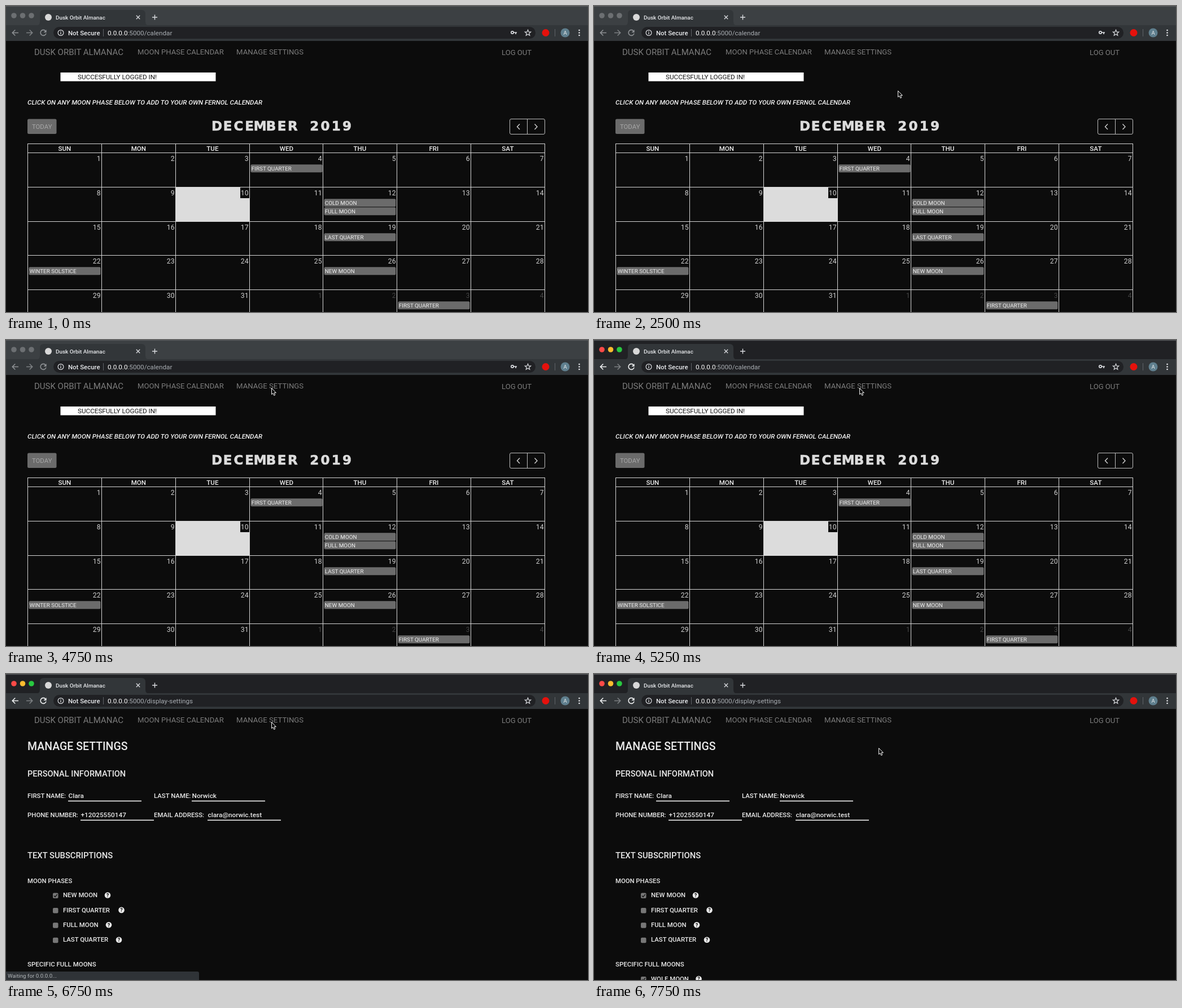
These frames come from a looping animation (1031 px wide and 543 px high, 8000 ms). An HTML page:

```html
<!DOCTYPE html>
<html lang="en">
<head>
<meta charset="utf-8">
<title>Moon calendar</title>
<style>
html, body { margin: 0; width: 100%; height: 100%; overflow: hidden; background: #0c0c0c; }
svg { display: block; font-family: Roboto, Arial, sans-serif; }
text { white-space: pre; }
</style>
</head>
<body>
<svg id="stage" width="1031" height="543" viewBox="0 0 1031 543"></svg>
<script>
const LOOP = 8000;
const FOCUS = 5250, HOVER = 6250, LOAD = 6500, OPEN = 6750, DONE = 7250;

// Pointer positions as [time, x, y]; it jumps from one to the next.
const pointer = [
  [500, 693, 4], [750, 645, 11], [1500, 644, 12], [1750, 642, 91], [2000, 624, 152],
  [2250, 610, 176], [2500, 538, 150], [3250, 515, 131], [3500, 497, 128], [3750, 494, 128],
  [4000, 465, 118], [4250, 465, 95], [4500, 468, 90], [4750, 470, 85], [7750, 504, 131]
];

const text = (x, y, size, fill, str, attrs = '') =>
  `<text x="${x}" y="${y}" font-size="${size}" fill="${fill}" ${attrs}>${str}</text>`;
const rect = (x, y, w, h, fill, r = 0, attrs = '') =>
  `<rect x="${x}" y="${y}" width="${w}" height="${h}" rx="${r}" fill="${fill}" ${attrs}/>`;
const circle = (x, y, r, fill, attrs = '') =>
  `<circle cx="${x}" cy="${y}" r="${r}" fill="${fill}" ${attrs}/>`;
const line = (d, color, width = 1, attrs = '') =>
  `<path d="${d}" fill="none" stroke="${color}" stroke-width="${width}" ${attrs}/>`;
const during = (from, to, ...parts) =>
  `<g data-from="${from}" data-to="${to}">${parts.join('')}</g>`;
const MIDDLE = 'text-anchor="middle"', END = 'text-anchor="end"', MEDIUM = 'font-weight="500"';

function reload(color) {
  return line('M70 44.2A5 5 0 1 0 71 48.6', color, 1.6) +
    `<path d="M71.6 42v5h-5z" fill="${color}"/>`;
}

function frame(strip, lights, icon) {
  return rect(0, 0, 1031, 35, strip) + rect(0, 0, 1031, 1.2, '#55585b') +
    '<path d="M53 35q7 0 7-7V14q0-7 7-7H240q7 0 7 7V28q0 7 7 7z" fill="#323639"/>' +
    lights.map((c, i) => circle(14 + 15.5 * i, 17, 4.8, c)).join('') +
    line('M259 20h9M263.5 15.5v9', '#dadce0', 1.4) +
    rect(0, 34, 1031, 28, '#323639') + rect(84, 37, 854, 21, '#202124', 10.5) +
    line('M22 47.5H11.5M16.3 42.5l-5 5 5 5', icon, 1.6);
}

function tabTitle(str, size) {
  return text(88, 23.5, size, '#e8eaed', str, MEDIUM);
}

function address(path) {
  return text(180, 51.5, 11.7, '#fff', `0.0.0.0<tspan fill="#a8adb2">:5000/${path}</tspan>`);
}

function browser() {
  const star = Array.from({ length: 10 }, (_, i) => {
    const r = i % 2 ? 2.4 : 5.5, a = i * Math.PI / 5;
    return `${924.5 + r * Math.sin(a)} ${47.8 - r * Math.cos(a)}`;
  }).join('L');
  const favicon = circle(75, 20, 6, '#d8d8d8');
  const grey = '#6c6f72', bright = '#f1f3f4', dull = '#8e9194';
  return [
    during(0, FOCUS, frame('#3c4043', [grey, grey, grey], dull), reload(dull)),
    during(FOCUS, LOOP, frame('#202124', ['#fc4a47', '#fdbc2f', '#29c840'], bright)),
    during(FOCUS, LOAD, reload(bright)),
    during(OPEN, LOOP, reload(bright)),
    during(LOAD, OPEN, line('M61.5 43l9 9M70.5 43l-9 9', bright, 1.6),
      line('M76 15.5A4.5 4.5 0 0 0 73 24', '#9aa0a6', 1.5),
      tabTitle('0.0.0.0:5000/display-settings', 9.9)),
    during(0, LOAD, favicon, tabTitle('Dusk Orbit Almanac', 9.9), address('calendar'),
      circle(897, 47, 2.2, 'none', 'stroke="#dadce0" stroke-width="1.7"'),
      line('M899 47h6M903 47v3', '#dadce0', 1.7)),
    during(OPEN, LOOP, favicon, tabTitle('Dusk Orbit Almanac', 9.9)),
    during(LOAD, LOOP, address('display-settings')),
    line('M230.8 16.8l6.4 6.4M237.2 16.8l-6.4 6.4', '#dadce0', 1.3),
    line('M36 47.5h10.5M41.7 42.5l5 5-5 5', '#7d8083', 1.6),
    circle(97, 47.5, 4.9, 'none', 'stroke="#dadce0" stroke-width="1.2"'),
    line('M97 46.6v3.6M97 44.3v1.3', '#dadce0', 1.3),
    text(110, 51.5, 11.4, '#e8eaed', 'Not Secure', MEDIUM),
    line('M172.5 41v13M972.5 41v13', '#5f6368'),
    line(`M${star}Z`, '#dadce0', 1.2),
    circle(956, 47.5, 6.5, '#e5110c'),
    circle(990.5, 47.5, 8, '#5f7f8e'),
    text(990.5, 51, 9.5, '#eee', 'A', MIDDLE),
    [43, 47.5, 52].map(y => circle(1015.5, y, 1.3, '#e8eaed')).join('')
  ].join('');
}

function nav() {
  const grey = '#7c7c7c', link = c => text(408, 86.3, 13.2, c, 'MANAGE SETTINGS');
  return text(50, 87, 15, grey, 'DUSK ORBIT ALMANAC') +
    text(233, 86.3, 13.1, grey, 'MOON PHASE CALENDAR') +
    text(878, 87, 13.1, grey, 'LOG OUT') +
    during(0, HOVER, link(grey)) + during(HOVER, OPEN, link('#f2f2f2')) + during(OPEN, LOOP, link(grey));
}

function calendar() {
  const colX = c => 38.5 + Math.round(130.86 * c), rowY = r => 260.5 + Math.round(60.8 * r);
  const out = [
    rect(96.5, 118, 275, 15.5, '#fff'),
    text(127, 130, 11.7, '#111', 'SUCCESFULLY LOGGED IN!'),
    text(38, 175, 11.7, '#f2f2f2', 'CLICK ON ANY MOON PHASE BELOW TO ADD TO YOUR OWN FERNOL CALENDAR',
      'font-style="italic" font-weight="500"'),
    rect(38, 200.5, 51.5, 26.5, '#6b6b6b', 2.5),
    text(63.7, 218, 11.4, '#a8a8a8', 'TODAY', MIDDLE),
    rect(892.5, 200.5, 62, 27, 'none', 2.5, 'stroke="#bdbdbd"'),
    line('M923.5 200v27', '#bdbdbd'),
    line('M910 209.5l-4.5 4.7 4.5 4.7M936.5 209.5l4.5 4.7-4.5 4.7', '#d0d0d0', 1.4)
  ];
  const title = 'DECEMBER 2019';
  const xs = [...title].map((_, i) => (373.5 + 19.2 * i).toFixed(1)).join(' ');
  out.push(text(xs, 220.5, 23, '#dcdcdc', title,
    `${MIDDLE} font-weight="bold" font-family="DejaVu Sans, sans-serif" stroke="#dcdcdc" stroke-width=".6"`));

  out.push(rect(colX(2), rowY(1), 131, 61, '#dcdcdc'), rect(415, rowY(1), 16, 19.5, '#0c0c0c'));
  let grid = 'M38 244.5H955';
  for (let r = 0; r < 5; r++) grid += `M38 ${rowY(r)}H955`;
  for (let c = 0; c < 8; c++) grid += `M${colX(c)} 244V543`;
  out.push(line(grid, '#d6d6d6'));

  ['SUN', 'MON', 'TUE', 'WED', 'THU', 'FRI', 'SAT'].forEach((day, c) =>
    out.push(text(colX(c) + 65.4, 256.7, 11.6, '#ececec', day, `${MIDDLE} ${MEDIUM}`)));
  for (let i = 0; i < 35; i++) {
    const r = Math.floor(i / 7);
    out.push(text(colX(i % 7 + 1) - 1.8, rowY(r) + 14, 12.3, i < 31 ? '#cfcfcf' : '#454545', i % 31 + 1, END));
  }
  [[3, 0, 0, 'FIRST QUARTER'], [4, 1, 0, 'COLD MOON'], [4, 1, 1, 'FULL MOON'], [4, 2, 0, 'LAST QUARTER'],
   [0, 3, 0, 'WINTER SOLSTICE'], [4, 3, 0, 'NEW MOON'], [5, 4, 0, 'FIRST QUARTER']
  ].forEach(([c, r, slot, name]) => {
    const x = colX(c) + 2, y = rowY(r) + 20.8 + 15 * slot;
    out.push(rect(x, y, 127, 14, '#6b6b6b', 2), text(x + 1.3, y + 10.6, 9.9, '#f0f0f0', name));
  });
  return out.join('');
}

function settings() {
  const ink = '#e9e9e9';
  const field = (x, y, label, inputX, value) =>
    text(x, y, 11.4, ink, label) + text(inputX + 0.5, y, 11.8, ink, value) +
    rect(inputX, y + 4.6, 130, 1.6, '#f2f2f2');
  const option = (i, label, helpX, on) => {
    const y = 392.5 + 26.4 * i - (i > 4 ? 9.9 : 0);
    return rect(83, y - 4, 9.5, 9.5, '#777', 2) +
      (on ? line(`M85 ${y + 1}l2 2.2 3.8-4.8`, '#161616', 1.5) : '') +
      text(101, y + 3.7, 11.4, ink, label) + circle(helpX, y, 5.3, ink) +
      text(helpX, y + 3.2, 9, '#0c0c0c', '?', `${MIDDLE} font-weight="bold"`);
  };
  return [
    `<g ${MEDIUM}>`,
    text(38, 135.2, 19.5, ink, 'MANAGE SETTINGS'),
    text(38, 181.6, 14.6, ink, 'PERSONAL INFORMATION'),
    field(38, 220, 'FIRST NAME:', 110, 'Clara'),
    field(262, 220, 'LAST NAME:', 329, 'Norwick'),
    field(38, 254, 'PHONE NUMBER:', 132, '+12025550147'),
    field(262, 254, 'EMAIL ADDRESS:', 357, 'clara@norwic.test'),
    text(38, 327, 14.8, ink, 'TEXT SUBSCRIPTIONS'),
    text(38, 370.5, 11.3, ink, 'MOON PHASES'),
    option(0, 'NEW MOON', 180, true),
    option(1, 'FIRST QUARTER', 204.5),
    option(2, 'FULL MOON', 182),
    option(3, 'LAST QUARTER', 200),
    text(38, 519, 11.5, ink, 'SPECIFIC FULL MOONS'),
    option(6, 'WOLF MOON', 185.5, true),
    '</g>'
  ].join('');
}

const stage = document.getElementById('stage');
stage.innerHTML = rect(0, 0, 1031, 543, '#0c0c0c') + browser() + nav() +
  during(0, OPEN, calendar()) + during(OPEN, LOOP, settings()) +
  during(LOAD, DONE, '<path d="M0 528H339q3 0 3 3V543H0z" fill="#2f3337"/>',
    text(3, 539.3, 9.75, '#b4b8bc', 'Waiting for 0.0.0.0...')) +
  '<path id="arrow" d="M.6.6V11.6L3 9.4 4.8 13.4 6.7 12.6 5 8.7H8.4Z" fill="#000" stroke="#fff"/>';

const arrow = document.getElementById('arrow');
const scenes = [...stage.querySelectorAll('[data-from]')];

function draw() {
  const t = performance.now() % LOOP;
  for (const s of scenes)
    s.style.display = t >= +s.dataset.from && t < +s.dataset.to ? '' : 'none';
  const spot = pointer.filter(p => p[0] <= t).pop();
  arrow.style.display = spot ? '' : 'none';
  if (spot) arrow.setAttribute('transform', `translate(${spot[1]} ${spot[2]})`);
  requestAnimationFrame(draw);
}
draw();
</script>
</body>
</html>
```
